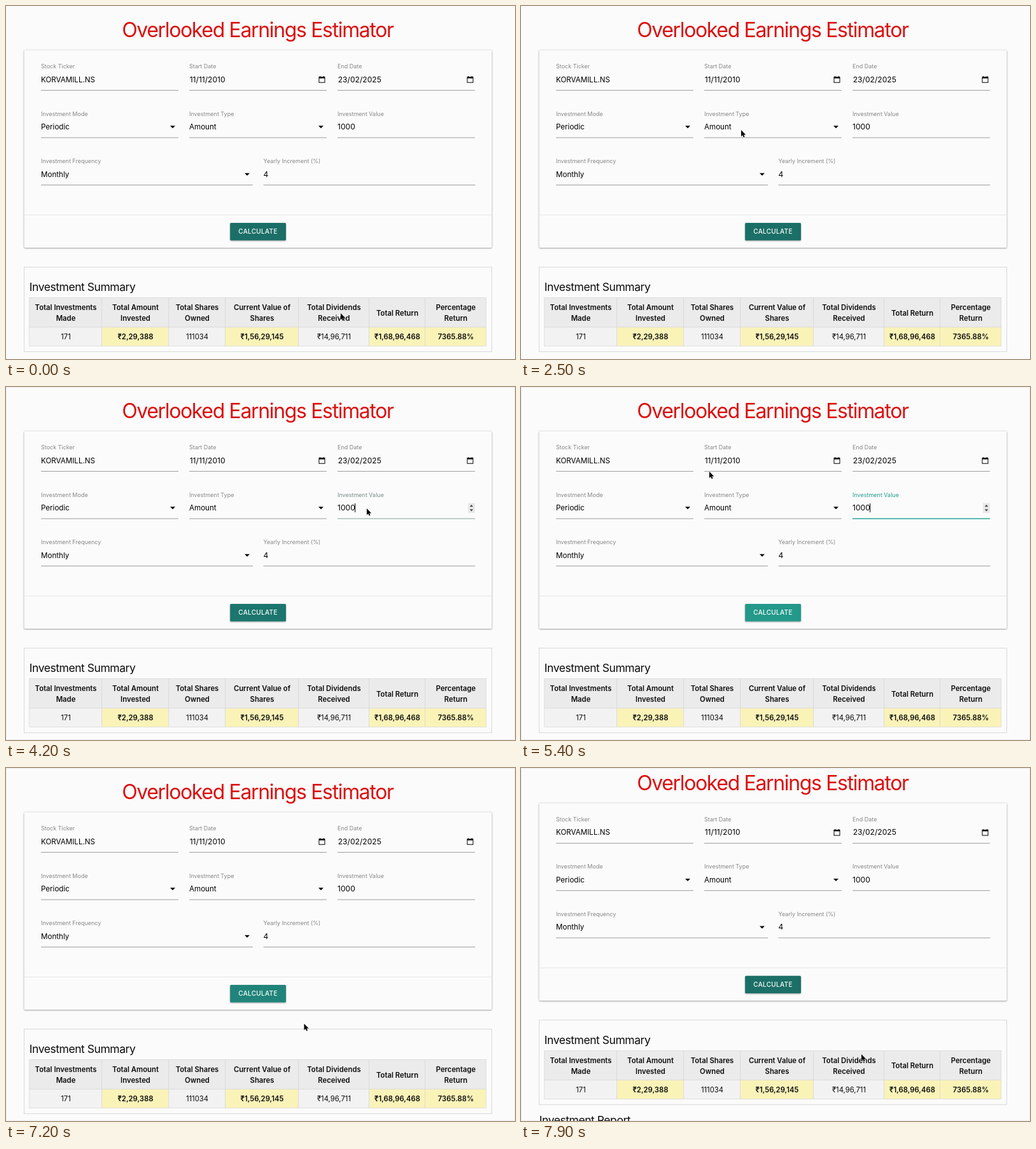
Animation, 800 px wide and 555 px high, one loop 8 s. Source, as an HTML page:

```html
<!DOCTYPE html>
<html lang="en">
<head>
<meta charset="utf-8">
<title>Overlooked Earnings Estimator</title>
<style>
  html, body { margin: 0; width: 100%; height: 100%; overflow: hidden; background: #fbfbfb; }
  svg { display: block; width: 100%; height: 100%; }
  text { font-family: Inter, Roboto, "Liberation Sans", sans-serif; font-optical-sizing: none; fill: #0c0c0c; }
  .title { font-size: 32px; font-weight: 430; letter-spacing: -1.35px; fill: #dc1010; text-anchor: middle; }
  .label { font-size: 9px; fill: #868686; }
  .value, .number { font-weight: 440; fill: #000; }
  .value { font-size: 11.6px; }
  .number { font-size: 12.1px; }
  .heading { font-size: 17.5px; font-weight: 440; letter-spacing: -.45px; fill: #0c0c0c; }
  .head, .cell { font-size: 11.3px; text-anchor: middle; }
  .head, .strong { font-weight: 620; }
  .caps { font-size: 10px; font-weight: 480; letter-spacing: .3px; fill: #fff; text-anchor: middle; }
  .rule { stroke: #9c9c9c; }
  .grid { stroke: #d9d9d9; }
  .table { stroke: #d9d9d9; stroke-width: .75; }
  .card { fill: #fbfbfb; filter: drop-shadow(0 1.2px 1.2px rgba(0,0,0,.3)) drop-shadow(0 0 1.2px rgba(0,0,0,.16)); }
  #button { filter: drop-shadow(0 1.3px 1.2px rgba(0,0,0,.35)); }
  #edge { fill: none; stroke: #ececec; }
</style>
</head>
<body>
<svg viewBox="0 0 800 555" preserveAspectRatio="none">
  <rect id="edge" x=".5" y=".5" width="799" height="554"/>
  <g id="page">
    <rect class="card" x="28.5" y="69.5" width="735" height="310.5" rx="1.5"/>
    <path d="M28.5 328.5h735" stroke="#e6e6e6"/>
    <rect id="button" x="352.2" y="341" width="87.8" height="27.5" rx="1.5"/>
    <rect x="28.5" y="410.5" width="735" height="133" fill="none" class="grid"/>
  </g>
  <path id="cursor" d="M0 0V10.2L2.3 8.1 3.8 11.5 5.5 10.7 4.1 7.4H7.3Z"
        fill="#000" stroke="#fff" stroke-width=".8" stroke-linejoin="round" paint-order="stroke"/>
</svg>
<script>
const page = document.getElementById("page");
const button = document.getElementById("button");
const cursor = document.getElementById("cursor");
const edge = document.getElementById("edge");

function add(tag, attrs, content = "") {
  const node = document.createElementNS("http://www.w3.org/2000/svg", tag);
  for (const key in attrs) node.setAttribute(key, attrs[key]);
  node.textContent = content;
  page.append(node);
  return node;
}
const text = (cls, x, y, content) => add("text", { class: cls, x, y }, content);
const path = (d, fill = "#000") => add("path", { d, fill, "fill-rule": "evenodd" });

function field(x, y, width, name, value, kind = "number") {
  const label = text("label", x, y, name);
  const cls = kind === "text" || kind === "select" ? "value" : "number";
  text(cls, kind === "date" ? x + .7 : x, y + 21.4, value);
  const line = add("path", { class: "rule", d: `M${x} ${y + 34.3}h${width}` });
  const right = x + width;
  if (kind === "select") path(`M${right - 13} ${y + 15.6}h8l-4 4z`);
  if (kind === "date") {
    path(`M${right - 12.5} ${y + 12.9}h1.6v-.9h1.1v.9h4.6v-.9h1.1v.9h1.6v9.6h-10z` +
         "m1 2.6v6h8v-6z");
  }
  return { label, line };
}

text("title", 395.5, 49, "Overlooked Earnings Estimator");
field(55, 98.3, 216, "Stock Ticker", "KORVAMILL.NS", "text");
field(288, 98.3, 216, "Start Date", "11/11/2010", "date");
field(521, 98.3, 216, "End Date", "23/02/2025", "date");
field(55, 172.7, 216, "Investment Mode", "Periodic", "select");
field(288, 172.7, 216, "Investment Type", "Amount", "select");
const amount = field(521, 172.7, 216, "Investment Value", "1000");
field(55, 247.1, 333, "Investment Frequency", "Monthly", "select");
field(404.5, 247.1, 333, "Yearly Increment (%)", "4");
text("caps", 396, 358.4, "CALCULATE");

const caret = path("M548.2 183h1v14h-1z");
const spinner = [
  path("M726 182.5h11v15.5h-11z", "#e8e8e8"),
  path("M728.8 188.2l2.7-3.2 2.7 3.2z", "#444"),
  path("M728.8 192.3l2.7 3.2 2.7-3.2z", "#444")
];

text("heading", 36.8, 448, "Investment Summary");
text("heading", 28.8, 574.5 - 14.3 + 14.3, "Investment Report");

const edges = [37, 151, 256, 345, 460, 571, 659, 755];
const columns = [
  ["Total Investments|Made", "171"],
  ["Total Amount|Invested", "₹2,29,388", true],
  ["Total Shares|Owned", "111034"],
  ["Current Value of|Shares", "₹1,56,29,145", true],
  ["Total Dividends|Received", "₹14,96,711"],
  ["Total Return", "₹1,68,96,468", true],
  ["Percentage|Return", "7365.88%", true]
];
columns.forEach(([name, value, strong], i) => {
  const x = edges[i], width = edges[i + 1] - x, mid = x + width / 2;
  const box = (y, height, fill) =>
    add("rect", { class: "table", x: x - .3, y, width, height, fill });
  box(458.6, 46.4, "#ebebeb");
  box(505, 29.7, strong ? "#faf3b8" : "#f2f2f2");
  const lines = name.split("|");
  lines.forEach((line, n) =>
    text("head", mid, 486.6 + (n - (lines.length - 1) / 2) * 16.8, line));
  text(strong ? "cell strong" : "cell", mid, 524.3, value);
});

// Pointer stops: time, x, y
const stops = [
  [0, 526, 483], [400, 526, 483], [1100, 330, 230], [1700, 92, 195],
  [1900, 92, 195], [2500, 346, 195], [3000, 348, 197], [3900, 564, 193],
  [4200, 567, 191], [4600, 567, 191], [5400, 296, 133], [5700, 300, 132],
  [6400, 402, 354], [6800, 402, 354], [7600, 535, 450], [8000, 535, 450]
];
const ramp = (t, from, to) => Math.min(1, Math.max(0, (t - from) / (to - from)));
const ease = p => p * p * (3 - 2 * p);
const mix = (a, b, p) => `color-mix(in srgb, ${b} ${p * 100}%, ${a})`;
const show = (node, on) => node.setAttribute("visibility", on ? "visible" : "hidden");

function pointer(t) {
  const i = stops.findIndex(stop => t < stop[0]);
  const [t0, x0, y0] = stops[i - 1], [t1, x1, y1] = stops[i];
  const p = ease(ramp(t, t0, t1));
  return [x0 + (x1 - x0) * p, y0 + (y1 - y0) * p];
}

function render(t) {
  cursor.setAttribute("transform", `translate(${pointer(t)})`);
  page.setAttribute("transform", `translate(0 ${t >= 7900 ? -14.3 : 0})`);
  show(edge, t >= 2800);

  const focus = ramp(t, 4150, 4450) - ramp(t, 6600, 6900);
  amount.label.style.fill = mix("#868686", "#1f9a8c", focus);
  amount.line.style.stroke = mix("#9c9c9c", "#26a69a", focus);
  amount.line.style.strokeWidth = 1 + .7 * focus;

  const active = t >= 4150 && t < 6600;
  show(caret, active && (t - 4150) % 1000 < 500);
  spinner.forEach(part => show(part, t >= 3800 && t < 6600));

  const dark = "#1b6f67", rest = "#23998a", hover = "#29afa0";
  button.style.fill = t < 6200 ? mix(dark, rest, ramp(t, 4150, 4450))
    : t < 7000 ? mix(rest, hover, ramp(t, 6200, 6500))
    : mix(hover, dark, ramp(t, 7000, 7300));
}

function tick() {
  // The picture advances ten times a second
  render(Math.floor(performance.now() % 8000 / 100) * 100);
  requestAnimationFrame(tick);
}
tick();
</script>
</body>
</html>
```
